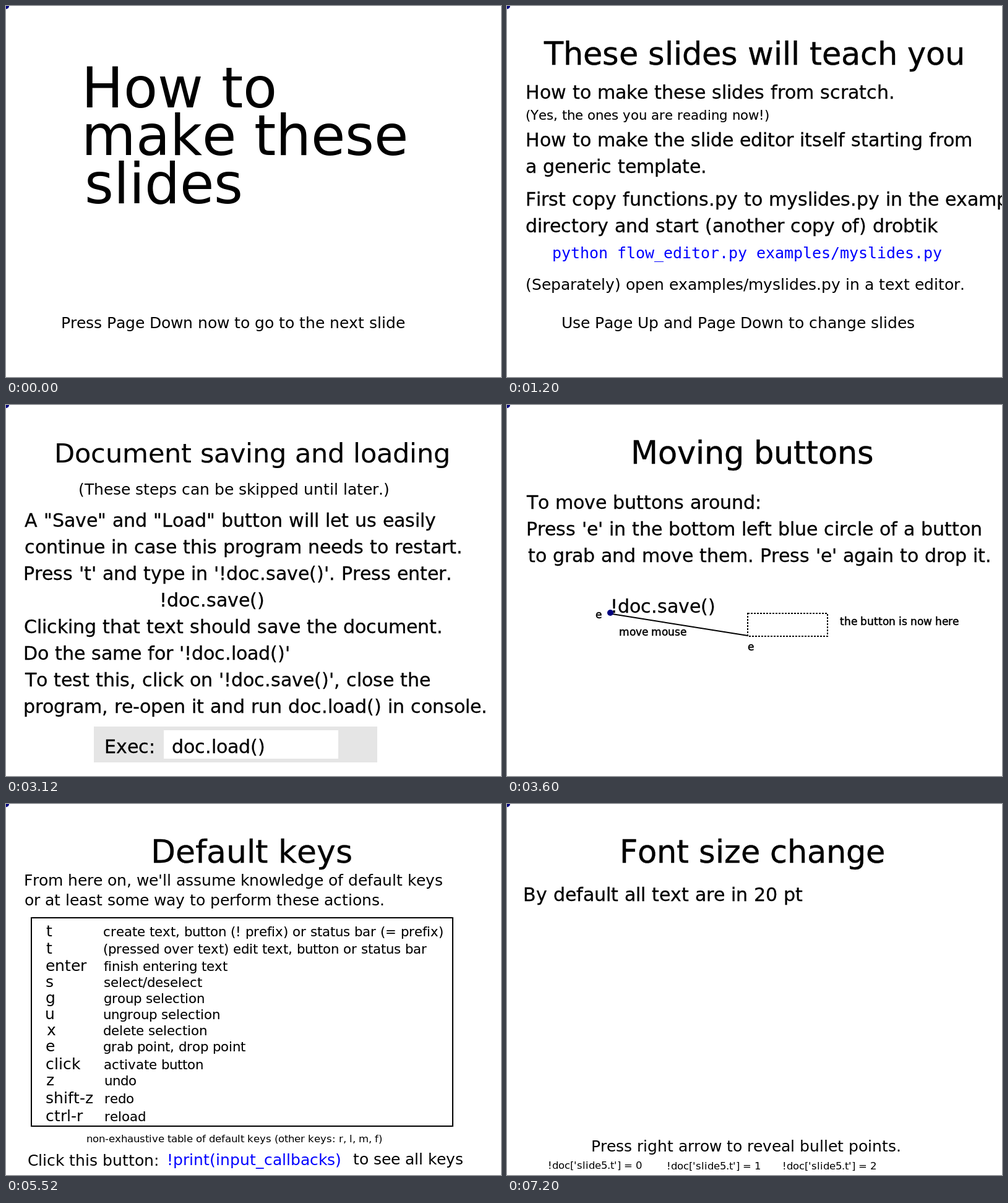
Animation, 800 px wide and 600 px high, one loop 8 s. Source, as an HTML page:

```html
<!DOCTYPE html>
<html lang="en">
<head>
<meta charset="utf-8">
<title>Slides</title>
<style>
  html, body { margin: 0; width: 100%; height: 100%; overflow: hidden; background: #fff; }
  svg { display: block; width: 800px; height: 600px; }
  text { white-space: pre; font-kerning: none; font-variant-ligatures: none; }
</style>
</head>
<body>
<svg id="stage" viewBox="0 0 800 600" xmlns="http://www.w3.org/2000/svg"></svg>
<script>
const SLIDE_MS = 1200, LOOP_MS = 8000;
const SANS = '"DejaVu Sans", sans-serif';
const MONO = '"DejaVu Sans Mono", monospace';
const NAVY = '#000080', BLUE = '#0000ff';
const BODY = 30.05, STEM = 0.09;

const stage = document.getElementById('stage');
const pen = document.createElement('canvas').getContext('2d');
const emWidths = {};

function add(parent, tag, attrs) {
  const el = document.createElementNS('http://www.w3.org/2000/svg', tag);
  for (const key in attrs) el.setAttribute(key, attrs[key]);
  return parent.appendChild(el);
}

// Glyph width for a font size of 1
function emWidth(ch, family) {
  const key = family + ch;
  if (!(key in emWidths)) {
    pen.font = '1000px ' + family;
    emWidths[key] = pen.measureText(ch).width / 1000;
  }
  return emWidths[key];
}

// Text whose glyphs advance by whole pixels, with stems rounded up to whole pixels
function label(g, size, x, y, str, fill = '#000', family = SANS) {
  const xs = [];
  for (const ch of str) {
    xs.push(x);
    x += Math.round(emWidth(ch, family) * size);
  }
  const stem = STEM * size;
  const text = add(g, 'text', {
    x: xs.join(' '), y, fill, 'font-size': size, 'font-family': family,
    stroke: fill, 'stroke-width': Math.max(0, Math.round(stem) - stem).toFixed(2)
  });
  text.textContent = str;
}

function rect(g, x1, y1, x2, y2, attrs) {
  add(g, 'rect', { x: x1, y: y1, width: x2 - x1, height: y2 - y1, ...attrs });
}

const outline = { fill: 'none', stroke: '#000', 'stroke-width': 2 };
const dot = (g, cx, cy) => add(g, 'circle', { cx, cy, r: 5, fill: NAVY });

function titleSlide(g) {
  label(g, 90, 122, 164, 'How to');
  label(g, 90, 122, 241, 'make these');
  label(g, 90, 127, 319, 'slides');
  label(g, 25, 89, 521, 'Press Page Down now to go to the next slide');
}

function introSlide(g) {
  label(g, 51, 60, 95, 'These slides will teach you');
  label(g, BODY, 30, 150, 'How to make these slides from scratch.');
  label(g, 21.28, 30, 184, '(Yes, the ones you are reading now!)');
  label(g, BODY, 30, 227, 'How to make the slide editor itself starting from');
  label(g, BODY, 30, 270, 'a generic template.');
  label(g, BODY, 30, 323, 'First copy functions.py to myslides.py in the examples');
  label(g, BODY, 30, 366, 'directory and start (another copy of) drobtik');
  label(g, 25, 73, 408, 'python flow_editor.py examples/myslides.py', BLUE, MONO);
  label(g, 25, 30, 459, '(Separately) open examples/myslides.py in a text editor.');
  label(g, 25, 88, 521, 'Use Page Up and Page Down to change slides');
}

function savingSlide(g) {
  label(g, 43, 78, 93, 'Document saving and loading');
  label(g, 25, 117, 145, '(These steps can be skipped until later.)');
  [
    [30, 'A "Save" and "Load" button will let us easily'],
    [30, 'continue in case this program needs to restart.'],
    [28, "Press 't' and type in '!doc.save()'. Press enter."],
    [248, '!doc.save()'],
    [29, 'Clicking that text should save the document.'],
    [28, "Do the same for '!doc.load()'"],
    [31, "To test this, click on '!doc.save()', close the"],
    [28, 'program, re-open it and run doc.load() in console.']
  ].forEach(([x, str], i) => label(g, BODY, x, 197 + 43 * i, str));
  rect(g, 142, 520, 600, 578, { fill: '#e5e5e5' });
  rect(g, 255, 526, 537, 572, { fill: '#fff' });
  label(g, BODY, 159, 563, 'Exec:');
  label(g, BODY, 268, 563, 'doc.load()');
}

function movingSlide(g) {
  label(g, 51, 200, 95, 'Moving buttons');
  label(g, BODY, 32, 168, 'To move buttons around:');
  label(g, BODY, 31, 211, "Press 'e' in the bottom left blue circle of a button");
  label(g, BODY, 34, 254, "to grab and move them. Press 'e' again to drop it.");
  label(g, BODY, 167, 336, '!doc.save()');
  add(g, 'path', { d: 'M167 337.5L389 373', ...outline });
  dot(g, 167, 336);
  rect(g, 389, 337, 518, 374, { ...outline, 'stroke-dasharray': '3 2' });
  label(g, 17, 143, 345, 'e');
  label(g, 17, 181, 373, 'move mouse');
  label(g, 17, 389, 397, 'e');
  label(g, 17, 538, 356, 'the button is now here');
}

function keysSlide(g) {
  label(g, 52, 234, 95, 'Default keys');
  label(g, 25, 29, 132, "From here on, we'll assume knowledge of default keys");
  label(g, 25, 30, 164, 'or at least some way to perform these actions.');
  rect(g, 41, 184, 722, 521, outline);
  [
    [214, 65, 't', 157, 'create text, button (! prefix) or status bar (= prefix)'],
    [242, 65, 't', 157, '(pressed over text) edit text, button or status bar'],
    [270, 64, 'enter', 158, 'finish entering text'],
    [296, 64, 's', 158, 'select/deselect'],
    [322, 64, 'g', 158, 'group selection'],
    [348, 63, 'u', 157, 'ungroup selection'],
    [374, 66, 'x', 157, 'delete selection'],
    [400, 64, 'e', 157, 'grab point, drop point'],
    [429, 64, 'click', 158, 'activate button'],
    [455, 65, 'z', 159, 'undo'],
    [484, 64, 'shift-z', 159, 'redo'],
    [513, 64, 'ctrl-r', 159, 'reload']
  ].forEach(([y, keyX, key, descX, desc]) => {
    label(g, 25, keyX, y, key);
    label(g, 21.25, descX, y, desc);
  });
  label(g, 16.5, 130, 547, 'non-exhaustive table of default keys (other keys: r, l, m, f)');
  label(g, 25, 35, 585, 'Click this button:');
  label(g, 25, 260, 584, '!print(input_callbacks)', BLUE);
  label(g, 25, 561, 583, 'to see all keys');
}

function warmUpSlide(g) {
  label(g, 52, 30, 95, 'Warm up: Font size changes');
  label(g, BODY, 29, 165, "We'll try to make the title slide first.");
  rect(g, 186, 195, 554, 420, outline);
  label(g, 42, 246, 258, 'How to');
  label(g, 42, 246, 301, 'make these');
  label(g, 42, 248, 344, 'slides');
  label(g, 14, 205, 399, 'Press Page Down now to go to the next slide');
  label(g, 25, 26, 468, 'Creating the text is easy: press t, type, press enter, repeat.');
  label(g, BODY, 25, 511, 'But now we have to change the font size.');
}

function fontSlide(g) {
  label(g, 51, 182, 95, 'Font size change');
  label(g, BODY, 26, 157, 'By default all text are in 20 pt');
  label(g, 25, 136, 562, 'Press right arrow to reveal bullet points.');
  label(g, 16.5, 66, 590, "!doc['slide5.t'] = 0");
  label(g, 16.5, 258, 591, "!doc['slide5.t'] = 1");
  label(g, 16.5, 445, 591, "!doc['slide5.t'] = 2");
}

const slides = [
  titleSlide, introSlide, savingSlide, movingSlide, keysSlide, warmUpSlide, fontSlide
].map(draw => {
  const g = add(stage, 'g', { display: 'none' });
  draw(g);
  return g;
});
dot(stage, 0, 0);

let shown = -1;
function render(ms) {
  const now = Math.floor((ms % LOOP_MS) / SLIDE_MS);
  if (now === shown) return;
  shown = now;
  slides.forEach((g, i) => g.setAttribute('display', i === now ? 'inline' : 'none'));
}

const start = performance.now();
function tick() {
  render(performance.now() - start);
  requestAnimationFrame(tick);
}
tick();
</script>
</body>
</html>
```
